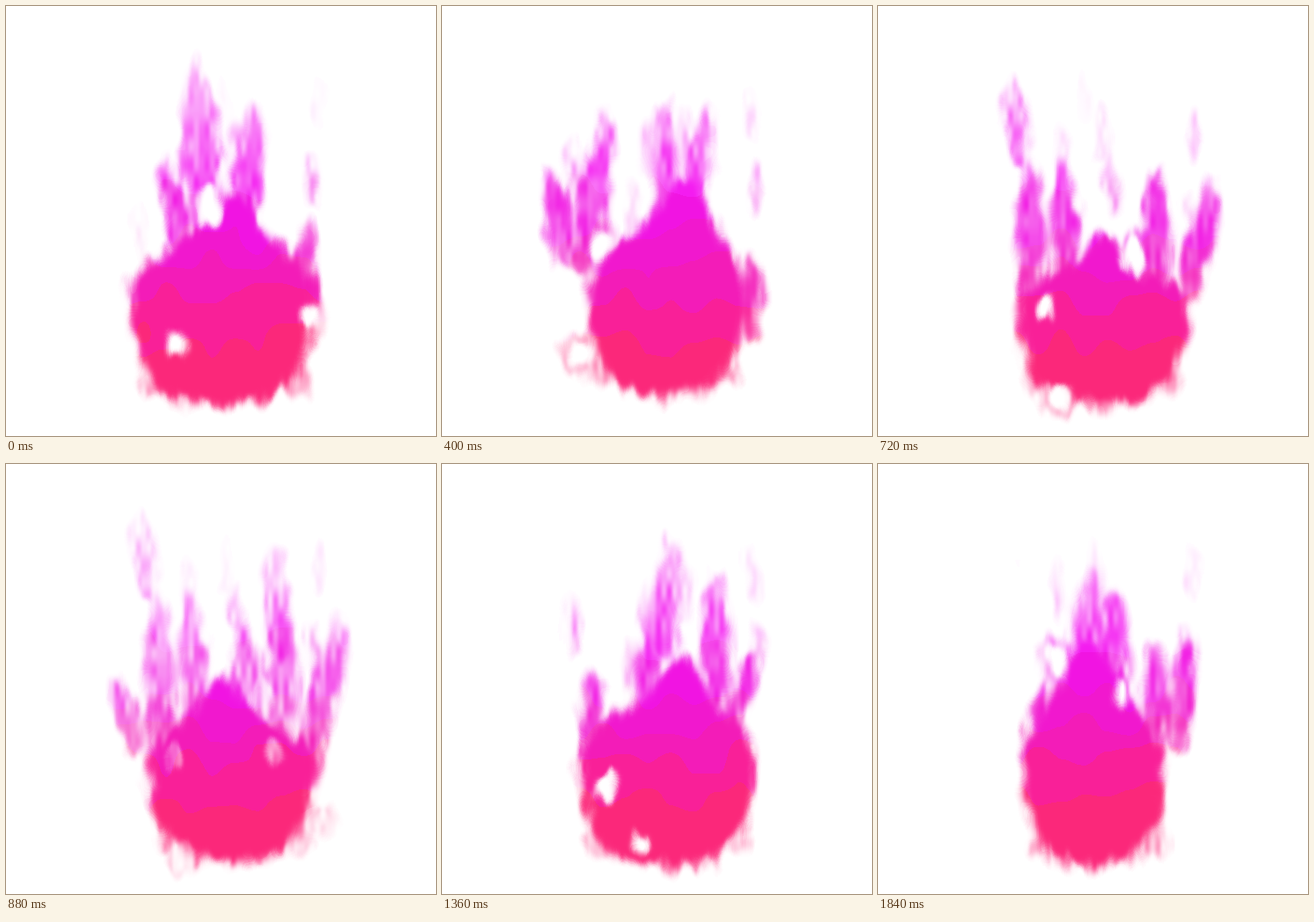
Write an HTML page with a canvas that moves like this. It is 489 px wide and 489 px high and loops after 1920 ms.

```html
<!DOCTYPE html>
<html lang="en">
<head>
<meta charset="utf-8">
<title>Magenta flame</title>
<style>
  html, body { margin: 0; width: 100%; height: 100%; overflow: hidden; background: #fff; }
  canvas { display: block; width: 100vw; height: 100vh; }
</style>
</head>
<body>
<canvas id="stage" width="489" height="489"></canvas>
<script>
const SIZE = 489, STEP_MS = 80, STEPS = 24, RISE = 15;
const LOOP_RISE = RISE * STEPS;

// body: left, right, shoulder y, base y, peak x, peak y
// licks: root x, y, tip x, y    voids: x, y, radius
const poses = [
  { at: 0, body: [138, 352, 325, 452, 260, 215],
    licks: [[200, 290, 180, 168], [226, 260, 217, 50], [270, 260, 282, 110], [335, 345, 343, 242]],
    voids: [[230, 230, 14], [193, 385, 12], [348, 352, 10]] },
  { at: 5, body: [163, 344, 322, 442, 277, 198],
    licks: [[158, 300, 190, 115], [138, 292, 121, 180], [252, 230, 254, 105], [285, 230, 306, 108], [350, 375, 352, 278]],
    voids: [[155, 396, 15], [180, 272, 13]] },
  { at: 9, body: [157, 352, 345, 454, 258, 262],
    licks: [[160, 180, 149, 82], [172, 340, 174, 168], [215, 330, 212, 172], [312, 340, 320, 180], [350, 335, 384, 195]],
    voids: [[291, 285, 14], [190, 345, 12], [203, 448, 15]] },
  { at: 13, body: [164, 350, 345, 452, 238, 225],
    licks: [[278, 270, 264, 148], [146, 315, 124, 215], [180, 335, 178, 228], [308, 190, 307, 60], [345, 355, 350, 228]],
    voids: [[303, 315, 10], [361, 404, 10]] },
  { at: 17, body: [154, 357, 335, 456, 270, 222],
    licks: [[310, 270, 309, 120], [232, 270, 236, 185], [250, 215, 262, 80], [330, 300, 355, 212], [175, 350, 168, 235]],
    voids: [[185, 368, 14], [229, 430, 11]] },
  { at: 19, body: [176, 330, 345, 455, 250, 235],
    licks: [[310, 300, 314, 115], [330, 330, 360, 190], [266, 280, 262, 95], [215, 310, 208, 142], [180, 280, 174, 142]],
    voids: [[239, 238, 19], [190, 442, 9]] },
  { at: 23, body: [163, 328, 335, 455, 240, 200],
    licks: [[228, 270, 248, 112], [268, 270, 267, 140], [180, 340, 185, 245], [320, 310, 315, 198], [342, 320, 356, 190]],
    voids: [[203, 225, 11], [278, 262, 9]] }
];

// lower limit and colour of each band
const bands = [
  [205, [244, 28, 240]], [262, [241, 20, 226]], [298, [241, 24, 206]],
  [334, [243, 28, 184]], [380, [249, 32, 152]], [999, [251, 40, 122]]
];

const TAU = Math.PI * 2;
const clamp = v => Math.max(0, Math.min(1, v));
const smooth = v => v * v * (3 - 2 * v);
const mix = (a, b, k) => a + (b - a) * k;
const rise = y => RISE * clamp((430 - y) / 260);

function hash(x, y) {
  let h = Math.imul(x, 374761393) + Math.imul(y, 668265263);
  h = Math.imul(h ^ (h >>> 13), 1274126177);
  return ((h ^ (h >>> 16)) >>> 0) / 4294967296;
}

// upward-moving noise that closes after one loop
function noise(x, y, step, width, height) {
  const rows = LOOP_RISE / height;
  const px = x / width, py = (y + step * RISE) / height;
  const ix = Math.floor(px), iy = Math.floor(py);
  const u = smooth(px - ix), v = smooth(py - iy);
  const top = iy % rows, low = (iy + 1) % rows;
  return mix(mix(hash(ix, top), hash(ix + 1, top), u),
             mix(hash(ix, low), hash(ix + 1, low), u), v);
}

function drawBody(g, [left, right, shoulder, base, px, py]) {
  const w = right - left, mid = (left + right) / 2;
  g.beginPath();
  g.moveTo(left, shoulder);
  g.bezierCurveTo(left + w * .03, base - 22, left + w * .18, base, mid, base);
  g.bezierCurveTo(right - w * .18, base, right - w * .03, base - 22, right, shoulder);
  g.bezierCurveTo(right - 6, shoulder - 45, px + 34, py + 60, px + 12, py);
  g.lineTo(px - 12, py);
  g.bezierCurveTo(px - 34, py + 60, left + 6, shoulder - 45, left, shoulder);
  g.fill();
}

function drawLick(g, [x0, y0, x1, y1], width) {
  const my = mix(y0, y1, .55), mx = mix(x0, x1, .4);
  g.beginPath();
  g.moveTo(x1, y1);
  g.quadraticCurveTo(mx - width * .75, my, x0 - width * .25, y0);
  g.quadraticCurveTo(x0, y0 + width * .3, x0 + width * .25, y0);
  g.quadraticCurveTo(mx + width * .75, my, x1, y1);
  g.fill();
}

// openings are round near the base and taller higher up
function drawVoid(g, x, y, r) {
  g.beginPath();
  g.ellipse(x, y, r, r * (1 + clamp((420 - y) / 250)), .1, 0, TAU);
  g.fill();
}

// faint strands that leave the fire twice per loop
function drawWisps(g, step) {
  for (let i = 0; i < 8; i++) {
    const age = (step * 2 / STEPS + hash(i, 7)) % 1;
    const x = 130 + 240 * hash(i, 3) + 6 * Math.sin(age * 5 + i);
    const y = 300 - age * LOOP_RISE / 2;
    g.globalAlpha = .4 * Math.sin(age * Math.PI);
    drawLick(g, [x, y, x + 10 * (hash(i, 5) - .5), y - 65], 12);
  }
}

// pale bubbles along the lower edge
function drawBubbles(g, step, [left, right, , base]) {
  for (let i = 0; i < 5; i++) {
    const side = (i - 2) / 2;
    const r = 13 + 4 * Math.sin(step / STEPS * TAU * 2 + i * 2);
    g.globalAlpha = .3;
    drawVoid(g, mix(left, right, .5 + side * .4), base - 4 - 20 * side * side, r);
  }
}

// the two neighbouring poses, each with its weight and distance in time
function neighbours(step) {
  let i = poses.length - 1;
  while (poses[i].at > step) i--;
  const a = poses[i], b = poses[(i + 1) % poses.length];
  const since = step - a.at;
  const span = (b.at - a.at + STEPS) % STEPS;
  const k = smooth(since / span);
  return [{ pose: a, weight: 1 - k, dt: since }, { pose: b, weight: k, dt: since - span }];
}

const soft = document.createElement('canvas');
soft.width = soft.height = SIZE;
const g = soft.getContext('2d', { willReadFrequently: true });

function drawDensity(step) {
  const near = neighbours(step);
  const [a, b] = near;
  const body = a.pose.body.map((v, i) => mix(v, b.pose.body[i], b.weight));
  const lift = (y, dt) => y - rise(y) * dt;

  g.globalCompositeOperation = 'source-over';
  g.clearRect(0, 0, SIZE, SIZE);
  g.filter = 'blur(4px)';
  drawWisps(g, step);
  drawBubbles(g, step, body);
  for (const { pose, weight, dt } of near) {
    for (const [x0, y0, x1, y1] of pose.licks) {
      g.globalAlpha = .78 * weight ** .6;
      drawLick(g, [x0, lift(y0, dt), x1, lift(y1, dt)], 13 + (y0 - y1) * .15);
    }
    g.globalAlpha = .35 * weight;
    for (const [x, y, r] of pose.voids) drawVoid(g, x, lift(y, dt), r + 6);
  }
  g.globalAlpha = 1;
  g.filter = 'blur(5px)';
  drawBody(g, body);

  g.globalCompositeOperation = 'destination-out';
  g.filter = 'blur(3px)';
  for (const { pose, weight, dt } of near) {
    g.globalAlpha = weight;
    for (const [x, y, r] of pose.voids) drawVoid(g, x, lift(y, dt), r);
  }
  return g.getImageData(0, 0, SIZE, SIZE).data;
}

const ctx = document.getElementById('stage').getContext('2d');
const cache = [];

function render(step) {
  const density = drawDensity(step);
  const img = ctx.createImageData(SIZE, SIZE);
  for (let y = 20; y < SIZE - 8; y++) {
    const fade = clamp((y - 35) / 170) ** .8;
    for (let x = 80; x < 420; x++) {
      // ragged edges: shift each sample with the rising noise
      const sx = Math.round(x + 12 * (noise(x, y, step, 16, 24) - .5));
      const sy = Math.round(y + 14 * (noise(x + 900, y, step, 12, 30) - .5));
      let d = density[(sy * SIZE + sx) * 4 + 3] / 255 * fade;
      if (d < .01) continue;
      const streak = noise(x + 300, y, step, 6, 20) - .5;
      d = clamp(d * (1 + (1 - d) * streak * 2));
      const tone = y + 46 * (noise(x, y, step, 26, 40) - .5);
      const color = bands.find(([limit]) => tone < limit)[1];
      img.data.set([...color, d * 255], (y * SIZE + x) * 4);
    }
  }
  return img;
}

const start = performance.now();
let shown = -1;

function tick() {
  const step = Math.floor((performance.now() - start) / STEP_MS) % STEPS;
  if (step !== shown) {
    cache[step] = cache[step] || render(step);
    ctx.putImageData(cache[step], 0, 0);
    shown = step;
  }
  requestAnimationFrame(tick);
}
tick();
</script>
</body>
</html>
```
